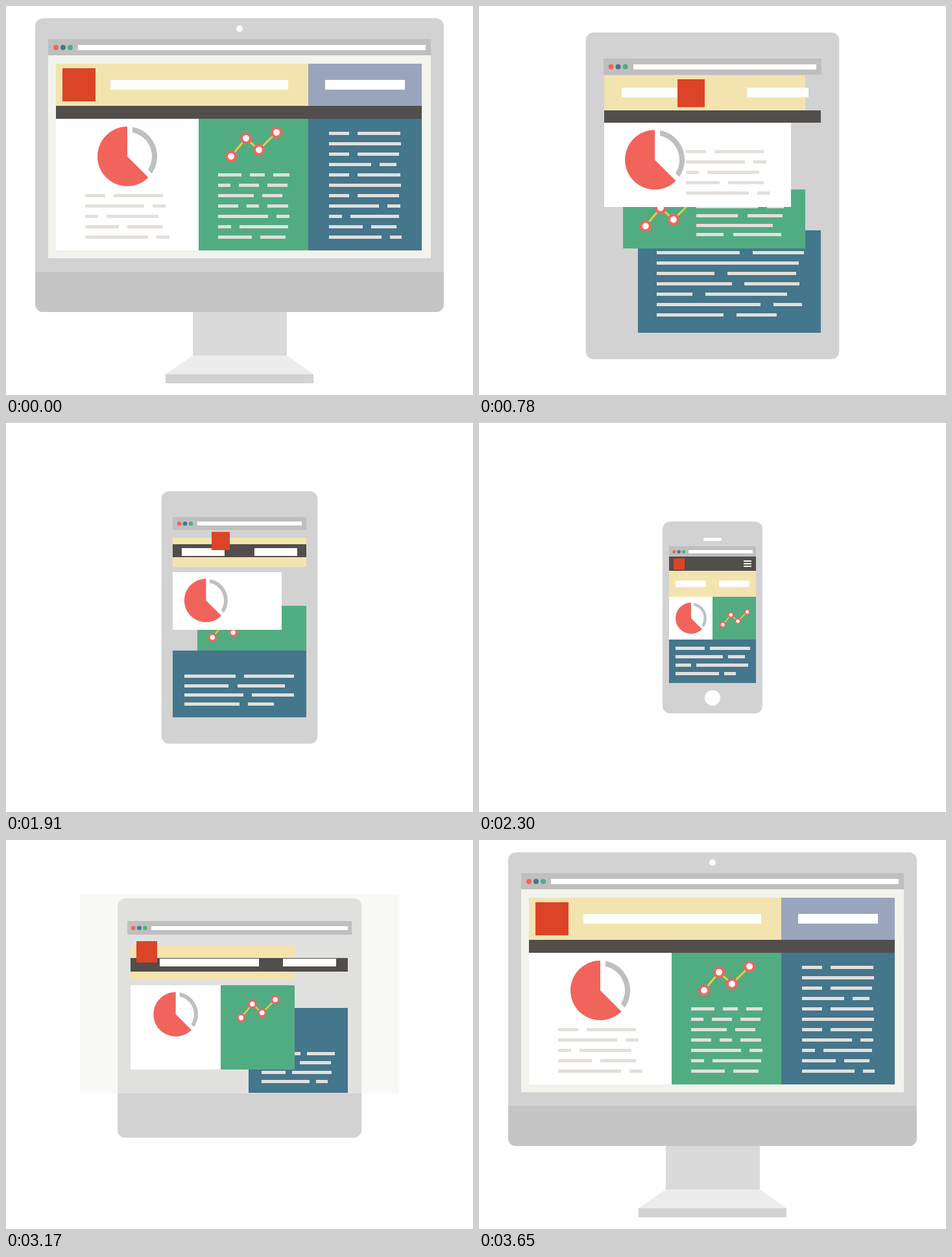
Recreate the animation shown at these times as an HTML page. Size 720 px wide and 600 px high, loop 4.15 s.

```html
<!DOCTYPE html>
<html lang="en">
<head>
<meta charset="utf-8">
<title>Responsive layout</title>
<style>
  html, body { margin: 0; width: 100%; height: 100%; overflow: hidden; background: #fff; }
  svg { display: block; width: 720px; height: 600px; }
  .flat { shape-rendering: crispEdges; }
</style>
</head>
<body>
<svg id="stage" viewBox="0 0 720 600"></svg>
<script>
const NS = 'http://www.w3.org/2000/svg';
const LOOP = 4150, STEP = 30, STEPS = 30;
const STARTS = [0, 1400, 2750];
const MID = 360;
const stage = document.getElementById('stage');

const INK = {
  body: '#d2d2d2', chrome: '#bfbfbf', red: '#f1645c', green: '#52ac82', blue: '#44768c',
  dark: '#524e4c', cream: '#f3e3af', purple: '#9aa5bd', line: '#e3dfdb', screen: '#f1f3ec',
  logo: '#dc4427', yellow: '#f3c842', white: '#fff'
};

function set(el, attrs) {
  for (const key in attrs) el.setAttribute(key, attrs[key]);
}
function add(tag, attrs, parent = stage) {
  const el = document.createElementNS(NS, tag);
  set(el, attrs);
  parent.appendChild(el);
  return el;
}
const mix = (a, b, p) => a + (b - a) * p;
const mixAll = (a, b, p) => a.map((v, i) => mix(v, b[i], p));
const clamp = v => Math.max(0, Math.min(1, v));

// A box is [left, top, right, bottom].
const boxAt = (cx, top, width, bottom) => [cx - width / 2, top, cx + width / 2, bottom];
const middle = ([x0, y0, x1, y1]) => [(x0 + x1) / 2, (y0 + y1) / 2];
const shift = ([x0, y0, x1, y1], dx, dy) => [x0 + dx, y0 + dy, x1 + dx, y1 + dy];
const place = (el, [x0, y0, x1, y1]) => set(el, { x: x0, y: y0, width: x1 - x0, height: y1 - y0 });

// Turns named grid areas into boxes.
function grid(cols, rows, areas) {
  const boxes = {};
  areas.forEach((names, r) => names.split(' ').forEach((name, c) => {
    const [x, y] = boxes[name] || [cols[c], rows[r]];
    boxes[name] = [x, y, cols[c + 1], rows[r + 1]];
  }));
  return boxes;
}

// Lays out word bars from their widths, one row per "|".
function para(left, top, pitch, gap, words, first = 0) {
  const rows = [];
  words.split('|').forEach((row, i) => {
    let x = left;
    const y = top + pitch * i;
    rows[first + i] = row.split(' ').map(Number).map(w => {
      const bar = [x, y, x + w, y + 5];
      x += w + gap;
      return bar;
    });
  });
  return rows;
}

const LEAD = '31 66|111|31 64', TAIL = '77 20|20 75|52 39';

const devices = [
  { // desktop
    body: [19, 630, 472], chrome: [51, 590, 1], logo: [112.5, 121.5, 51],
    field: [114, 15], field1: [298, 274], field2: [553.5, 123],
    pie: [187, 232, 1], chart: [347, 232, 1],
    cells: grid([77, 297, 466, 641], [89, 154, 174, 377],
      ['cream cream purple', 'dark dark dark', 'white green blue']),
    text: {
      white: para(122, 290, 16, 13, '31 76|91 20|20 80|52 55|97 20'),
      green: para(327, 258, 16, 13, '36 23 25|19 31 31|55 31|31 19 32|' + TAIL),
      blue: para(498, 194, 16, 13, `${LEAD}|65 26|${LEAD}|${TAIL}|81 18`)
    }
  },
  { // tablet
    body: [44, 354, 556], chrome: [85.3, 298, 1], logo: [MID, 136.5, 41],
    field: [128.2, 15], field1: [273.8, 90.5], field2: [446.2, 90.5],
    pie: [284, 238, 1], chart: [243, 356, 1],
    cells: grid([211, 509], [110, 162, 180.4, 300, 373, 523],
      ['cream', 'dark', 'white', 'green', 'blue']),
    text: {
      white: para(349, 211, 16, 13, '31 76|91 20|20 80|52 55|97 20'),
      green: para(336, 315, 13.8, 15, '104 26|71 58|128|44 83'),
      blue: para(239, 397, 16, 21, '144 80|236|99 112|122 95|61 134|177 45|107 69', 4)
    }
  },
  { // phone
    body: [152, 154, 448], chrome: [190, 134, 0.66], logo: [308.5, 217, 17],
    field: [243, 10], field1: [326.5, 47], field2: [393.5, 47],
    pie: [327, 301, 0.52], chart: [376, 311, 0.536],
    cells: grid([293, MID, 427], [206, 228, 268, 334, 401],
      ['dark dark', 'cream cream', 'white green', 'blue blue']),
    text: { white: [], green: [], blue: para(303, 345, 13, 8, '45 62|73 26|24 80|67 18', 7) }
  }
];

for (const d of devices) {
  const [top, width, s] = d.chrome;
  const chrome = boxAt(MID, top, width, top + 25 * s);
  const [x0, , x1] = chrome;
  const [fieldTop, fieldHeight] = d.field;
  const [lx, ly, side] = d.logo;
  const field = ([cx, w]) => boxAt(cx, fieldTop, w, fieldTop + fieldHeight);
  d.dots = [x0 + 12 * s, top + 13 * s, s];
  d.boxes = {
    ...d.cells, chrome,
    body: boxAt(MID, ...d.body),
    url: [x0 + 46 * s, top + 9 * s, x1 - 8 * s, top + 17 * s],
    field1: field(d.field1),
    field2: field(d.field2),
    logo: boxAt(lx, ly - side / 2, side, ly + side / 2)
  };
}
const [desktop, , phone] = devices;
const fullScreen = boxAt(MID, 76, 590, 389);
const leaveTo = boxAt(MID, 206, 134, 401);
const enterFrom = boxAt(MID, 91, 406, 393);

// Scene, back to front
const el = {}, bars = {}, FADE = { white: 5, green: 2.5, blue: 5 };
const box = (name, fill = INK[name]) => el[name] = add('rect', { fill, class: 'flat' });
function panel(name) {
  box(name);
  bars[name] = desktop.text[name].map(() =>
    [0, 1, 2].map(() => add('rect', { fill: INK.line, class: 'flat' })));
}

el.body = add('rect', { fill: INK.body, rx: 12 });
box('screen');
box('chrome');
box('url', INK.white);
el.dots = add('g', {});
['red', 'blue', 'green'].forEach((ink, i) => add('circle', { cx: i * 11, r: 4, fill: INK[ink] }, el.dots));

panel('blue');
panel('green');
el.chart = add('g', {});
const points = [[0, 0], [23, -28], [43, -10], [70, -37]];
add('polyline', { points: points.join(' '), fill: 'none', stroke: INK.yellow, 'stroke-width': 3 }, el.chart);
points.forEach(([cx, cy]) =>
  add('circle', { cx, cy, r: 7, fill: INK.white, stroke: INK.red, 'stroke-width': 4 }, el.chart));

panel('white');
el.pie = add('g', {});
add('path', { d: 'M0 0V-46A46 46 0 1 0 32.5 32.5Z', fill: INK.red }, el.pie);
add('path', { d: 'M8 -45.3A46 46 0 0 1 37.7 26.4L31.9 20.6A38 38 0 0 0 8 -37.1Z', fill: INK.chrome }, el.pie);

box('cream');
box('purple');
place(el.purple, desktop.cells.purple);
box('dark');
box('field1', INK.white);
box('field2', INK.white);
box('logo');

// Parts that show only while a device is at rest
const monitor = add('g', {});
place(add('rect', { fill: '#dadada' }, monitor), boxAt(MID + 0.5, 472, 145, 539));
add('path', { d: 'M288 539H433L474 568H246Z', fill: '#ececec' }, monitor);
place(add('rect', { fill: INK.body }, monitor), boxAt(MID, 568, 228, 582));
add('path', { d: 'M45 410H675V460A12 12 0 0 1 663 472H57A12 12 0 0 1 45 460Z', fill: '#c5c5c5' }, monitor);
add('circle', { cx: MID, cy: 35, r: 5, fill: INK.white }, monitor);

const handset = add('g', { fill: INK.white });
place(add('rect', { rx: 2 }, handset), boxAt(MID, 177, 28, 182));
add('circle', { cx: MID, cy: 424, r: 12 }, handset);
for (let y = 212; y <= 220; y += 4) place(add('rect', {}, handset), boxAt(414, y, 12, y + 2));

const show = (node, on) => set(node, { visibility: on ? 'visible' : 'hidden' });

// Bars present on both devices move; the rest fade along with their panel.
function drawText(name, from, to, k, now) {
  const [mx, my] = middle(now);
  const follow = (bar, device) => {
    const [cx, cy] = middle(device.boxes[name]);
    return shift(bar, mx - cx, my - cy);
  };
  const pick = (device, r, i) => (device.text[name][r] || [])[i];
  bars[name].forEach((row, r) => row.forEach((node, i) => {
    const a = pick(from, r, i), b = pick(to, r, i);
    if (a && b) place(node, mixAll(a, b, k / STEPS));
    else if (a) place(node, follow(a, from));
    else if (b) place(node, follow(b, to));
    const away = a && b ? 0 : a ? k : b ? STEPS - k : STEPS;
    set(node, { opacity: clamp(1 - away / FADE[name]) });
  }));
}

function draw(time) {
  const t = time % LOOP;
  const leg = t < STARTS[1] ? 0 : t < STARTS[2] ? 1 : 2;
  const from = devices[leg], to = devices[(leg + 1) % 3];
  const k = Math.min(STEPS, Math.floor((t - STARTS[leg]) / STEP + 1e-6));
  const p = k / STEPS;
  const resting = k === 0 ? from : k === STEPS ? to : null;

  for (const name in from.boxes) {
    if (!to.boxes[name]) continue;
    const now = mixAll(from.boxes[name], to.boxes[name], p);
    place(el[name], now);
    if (bars[name]) drawText(name, from, to, k, now);
  }
  for (const name of ['pie', 'chart', 'dots']) {
    const [x, y, s] = mixAll(from[name], to[name], p);
    set(el[name], { transform: `translate(${x} ${y}) scale(${s})` });
  }

  // How much of the desktop is present
  const desk = from === desktop ? 1 - p : to === desktop ? p : 0;
  place(el.screen, mixAll(to === desktop ? enterFrom : leaveTo, fullScreen, desk));
  set(el.screen, { opacity: desk });
  set(el.purple, { opacity: clamp(1 - (1 - desk) * STEPS / 5) });

  show(monitor, resting === desktop);
  show(handset, resting === phone);
}

function tick() {
  draw(performance.now());
  requestAnimationFrame(tick);
}
tick();
</script>
</body>
</html>
```
